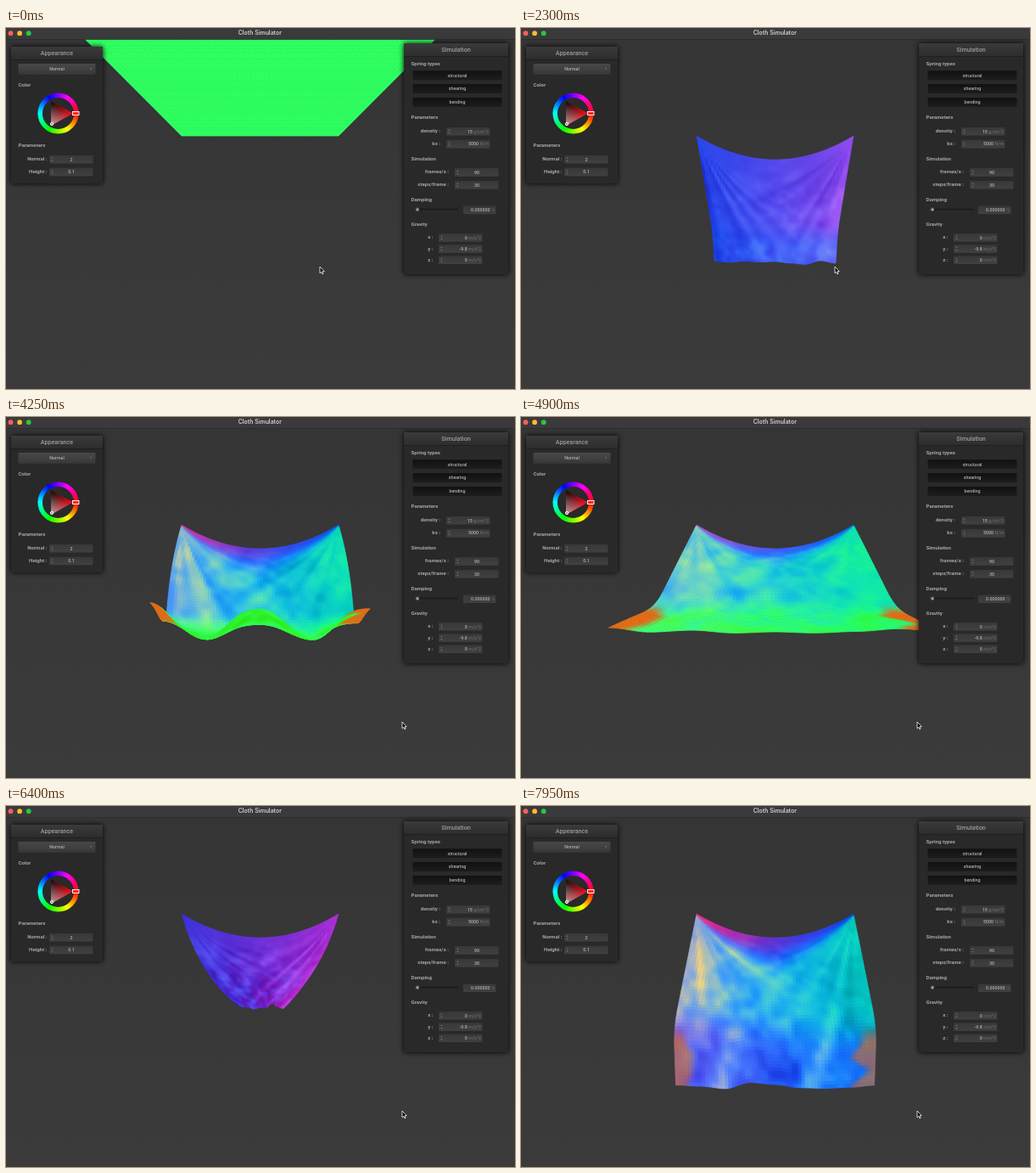
Write an HTML page with a canvas that moves like this. It is 600 px wide and 425 px high and loops after 8 s.

```html
<!DOCTYPE html>
<html lang="en">
<head>
<meta charset="utf-8">
<title>Cloth Simulator</title>
<style>
html, body { margin: 0; width: 100%; height: 100%; overflow: hidden; background: #383838; }
canvas { display: block; width: 600px; height: 425px; }
</style>
</head>
<body>
<canvas id="stage" width="600" height="425"></canvas>
<script>
const ctx = document.getElementById('stage').getContext('2d');
const LOOP = 8000, DROP = 950, CELLS = 60;

const clamp = x => Math.max(0, Math.min(1, x));
const mix = (a, b, k) => a + (b - a) * k;
const smooth = (a, b, x) => { x = clamp((x - a) / (b - a)); return x * x * (3 - 2 * x); };

// Smooth value noise in -1..1
const hash = (x, y) => { const h = Math.sin(x * 127.1 + y * 311.7) * 43758.5; return 2 * (h - Math.floor(h)) - 1; };
function noise(x, y) {
  const i = Math.floor(x), j = Math.floor(y), a = smooth(0, 1, x - i), b = smooth(0, 1, y - j);
  return mix(mix(hash(i, j), hash(i + 1, j), a), mix(hash(i, j + 1), hash(i + 1, j + 1), a), b);
}

// ---- Cloth: a unit square pinned by its far corners, swinging to and from the camera.
// Angles are degrees from hanging straight down, positive towards the camera.
const CAMERA = { x: 299.5, y: 219.5, focal: 293, distance: 1.585, pinHeight: .5 };
const swings = [
  { t: DROP, top: 90, hem: 90 },
  { t: 1600, top: 42, hem: 84 },
  { t: 2000, top: -5, hem: 20 },
  { t: 2850, top: -75, hem: -75, spread: 1.1 },
  { t: 3350, top: -62, hem: -66, spread: 1.25 },
  { t: 4250, top: 36, hem: 103, spread: .74, ripple: -18 },
  { t: 4720, top: 46, hem: 80, spread: .95 },
  { t: 5150, top: 44, hem: 78 },
  { t: 5550, top: 24, hem: 65, spread: .84, ripple: 18 },
  { t: 6400, top: -52, hem: -52, spread: .45 },
  { t: 7950, top: 28, hem: -5 }
].map(s => ({ spread: 1, ripple: 0, ...s }));

// Hermite interpolation, at rest at both ends.
function valueAt(t, name) {
  const last = swings.length - 1;
  if (t <= swings[0].t) return swings[0][name];
  if (t >= swings[last].t) return swings[last][name];
  const i = swings.findIndex(k => k.t > t) - 1, a = swings[i], b = swings[i + 1];
  const span = b.t - a.t, s = (t - a.t) / span, s2 = s * s, s3 = s2 * s;
  const slope = j => j <= 0 || j >= last ? 0
    : (swings[j + 1][name] - swings[j - 1][name]) / (swings[j + 1].t - swings[j - 1].t) * span;
  return (2 * s3 - 3 * s2 + 1) * a[name] + (s3 - 2 * s2 + s) * slope(i)
    + (3 * s2 - 2 * s3) * b[name] + (s3 - s2) * slope(i + 1);
}

function clothState(t) {
  const radians = name => valueAt(t, name) * Math.PI / 180;
  return {
    t, top: radians('top'), hem: radians('hem'),
    spread: valueAt(t, 'spread'), ripple: valueAt(t, 'ripple'),
    loose: smooth(DROP, 1700, t), age: smooth(1400, 3200, t)
  };
}
const bend = (cloth, v) => mix(cloth.top, cloth.hem, smooth(.6, .85, v));

// Follows the bent sheet from the pins to the hem and projects each row.
function clothGrid(cloth) {
  const { t, loose, age, spread, ripple } = cloth;
  const step = (1 + .05 * loose) / CELLS;
  let forward = 0, drop = 0;
  return Array.from({ length: CELLS + 1 }, (_, j) => {
    const v = j / CELLS;
    if (j) {
      const angle = bend(cloth, v - .5 / CELLS);
      forward += Math.sin(angle) * step;
      drop += Math.cos(angle) * step;
    }
    const scale = CAMERA.focal / (CAMERA.distance - forward);
    const width = scale * mix(1, spread, v * v);
    return Array.from({ length: CELLS + 1 }, (_, i) => {
      const u = i / CELLS;
      const sag = 28 * loose * 4 * u * (1 - u) * (1 - v) ** 2;
      const wave = smooth(.6, 1, v) * (ripple * Math.cos(4 * Math.PI * u) + 5 * age * noise(u * 8, t / 600));
      return [CAMERA.x + (u - .5) * width, CAMERA.y + scale * (drop - CAMERA.pinHeight) + sag + wave];
    });
  });
}

// Colour is the wrinkled surface normal mapped to RGB.
function clothColor(u, v, cloth) {
  const { t, loose, age } = cloth, base = bend(cloth, v);
  const front = smooth(-.5, .25, base), edge = Math.min(u, 1 - u);
  const angL = Math.atan2(v, u), angR = Math.atan2(v, 1 - u);
  const streak = loose * smooth(0, .25, v)
    * ((1 - u) * noise(angL * 11, t / 1500) + u * noise(angR * 11, 9 + t / 1500));
  const crease = age * smooth(0, .6, v + .2)
    * (noise(u * 9 + v * 3, v * 8 - t / 700) + .6 * noise(u * 24 - v * 5, v * 19 + t / 900));
  const rim = 1.1 * age * front * smooth(.42, .05, v / (1.05 - Math.abs(2 * u - 1)));
  const facing = Math.max(0, Math.cos(base));
  const tilt = (base > 0 ? base : base * .75) - rim
    + facing * (.35 * front * loose * (u - .5) + .3 * streak) + .32 * crease * mix(.5, 1, v);
  const side = loose * mix(-.3, .7 * facing, front) * (1 - 2 * u)
    + facing * (.4 * streak + .3 * crease) - .6 * Math.min(0, tilt);
  const nx = Math.max(-.95, Math.min(.95, side));
  const depth = Math.cos(tilt) * mix(1, Math.sqrt(1 - nx * nx), front);
  const rgb = [[nx, 2.45], [Math.sin(tilt), 1], [depth, 1.4]].map(([n, gamma]) => 255 * clamp((n + 1) / 2) ** gamma);
  // The lower corners turn over and show the underside.
  const turned = age * front * smooth(.35, .47, cloth.top) * smooth(.11, .05, edge + .05 * noise(v * 14, u)) * smooth(.7, .82, v);
  const underside = [225, 110, 25];
  return `rgb(${rgb.map((c, n) => Math.round(mix(c, underside[n], turned)))})`;
}

function drawCloth(t) {
  const cloth = clothState(t), grid = clothGrid(cloth);
  ctx.lineWidth = .7;
  for (let j = 0; j < CELLS; j++) for (let i = 0; i < CELLS; i++) {
    ctx.fillStyle = ctx.strokeStyle = clothColor((i + .5) / CELLS, (j + .5) / CELLS, cloth);
    polygon([grid[j][i], grid[j][i + 1], grid[j + 1][i + 1], grid[j + 1][i]]);
    ctx.fill();
    ctx.stroke();
  }
}

// ---- Interface
function polygon(points) {
  ctx.beginPath();
  points.forEach(p => ctx.lineTo(...p));
  ctx.closePath();
}
function disc(x, y, r, color) {
  ctx.fillStyle = color;
  ctx.beginPath();
  ctx.arc(x, y, r, 0, 7);
  ctx.fill();
}
function gradient(x0, y0, x1, y1, ...colors) {
  const g = ctx.createLinearGradient(x0, y0, x1, y1);
  colors.forEach((c, i) => g.addColorStop(i / (colors.length - 1), c));
  return g;
}
function box(x, y, w, h, top, bottom = top) {
  ctx.fillStyle = gradient(0, y, 0, y + h, top, bottom);
  ctx.beginPath();
  ctx.roundRect(x, y, w, h, 1);
  ctx.fill();
}
function text(str, x, y, { size = 6.1, color = '#a6a6a6', align = 'left', weight = 700, font = 'Roboto' } = {}) {
  ctx.font = `${weight} ${size}px ${font}, sans-serif`;
  ctx.fillStyle = color;
  ctx.textAlign = align;
  ctx.textBaseline = 'middle';
  ctx.fillText(str, x, y);
}
const small = { size: 5.3, weight: 500, align: 'center', color: '#b0b0b0' };

function panel(title, x, y, w, h) {
  ctx.save();
  ctx.shadowColor = '#000';
  ctx.shadowBlur = 6;
  box(x, y, w, h, '#292929');
  ctx.restore();
  box(x, y, w, 15, '#3a3a3a', '#2d2d2d');
  ctx.fillStyle = '#1c1c1c';
  ctx.fillRect(x, y + 15, w, .7);
  text(title, x + w / 2, y + 7.5, { size: 7.2, align: 'center', weight: 500, color: '#9c9c9c' });
}
function field(label, labelEnd, x, y, value, unit) {
  text(label, labelEnd, y - .3, { align: 'right' });
  box(x, y - 4.8, 51.5, 9.6, '#383838', '#404040');
  ctx.fillStyle = '#777';
  for (const d of [-1, 1]) {
    polygon([[x + 2.2, y + d], [x + 4.6, y + d], [x + 3.4, y + d * 2.6]]);
    ctx.fill();
  }
  if (!unit) return text(value, x + 26, y + .3, small);
  text(unit, x + 50, y + .3, { ...small, align: 'right', color: '#666' });
  text(value, x + 48.5 - ctx.measureText(unit).width, y + .3, { ...small, align: 'right' });
}

function colorWheel(x, y) {
  const hues = ctx.createConicGradient(0, x, y);
  for (let i = 0; i <= 12; i++) hues.addColorStop(i / 12, `hsl(${i * 30} 100% 50%)`);
  ctx.strokeStyle = hues;
  ctx.lineWidth = 5.5;
  ctx.beginPath();
  ctx.arc(x, y, 21.3, 0, 7);
  ctx.stroke();
  polygon([[x + 17.5, y], [x - 8.5, y + 14.5], [x - 8.5, y - 14.5]]);
  ctx.fillStyle = gradient(x - 9, y - 12, x + 16, y, '#111', '#f01020');
  ctx.fill();
  ctx.fillStyle = gradient(x - 8.5, y + 14.5, x + 3, y - 5, 'rgba(255,255,255,.6)', 'rgba(255,255,255,0)');
  ctx.fill();
  ctx.strokeStyle = '#fff';
  ctx.lineWidth = .9;
  ctx.beginPath();
  ctx.arc(x - 7.5, y + 12.5, 1.7, 0, 7);
  ctx.stroke();
  ctx.fillStyle = '#f22';
  ctx.fillRect(x + 17, y - 2, 7.5, 4);
  ctx.strokeRect(x + 17, y - 2, 7.5, 4);
}

function appearancePanel() {
  panel('Appearance', 6, 22, 108, 161);
  box(14.5, 42, 91, 12.7, '#484848', '#383838');
  text('Normal', 60, 48.5, small);
  text('›', 100, 47.5, small);
  text('Color', 14.5, 67);
  colorWheel(61.5, 100.5);
  text('Parameters', 14.5, 138.7);
  field('Normal :', 48.5, 51, 154.8, '2');
  field('Height :', 48.5, 51, 169.5, '0.1');
}

function simulationPanel() {
  panel('Simulation', 469, 18, 123, 272);
  [['Spring types', 42], ['Parameters', 105.5], ['Simulation', 154], ['Damping', 202], ['Gravity', 231.5]]
    .forEach(([title, y]) => text(title, 477.5, y));
  ['structural', 'shearing', 'bending'].forEach((name, i) => {
    const y = 50.3 + i * 15.8;
    box(479.5, y, 105, 11, '#111', '#1d1d1d');
    text(name, 532, y + 5.7, small);
  });
  field('density :', 512, 519, 121.7, '15', 'g/cm^2');
  field('ks :', 512, 519, 136.6, '5000', 'N/m');
  field('frames/s :', 522, 529, 169.9, '90');
  field('steps/frame :', 522, 529, 184.7, '30');
  box(485, 212.5, 48, 2, '#1b1b1b');
  disc(485, 213.7, 2.4, '#555');
  disc(485, 213.7, 1.3, '#aaa');
  box(539, 209.5, 38.5, 9.5, '#383838', '#404040');
  text('0.000000', 570.5, 214.7, { ...small, align: 'right' });
  text('%', 576.5, 214.7, { ...small, align: 'right', color: '#666' });
  [['x :', '0'], ['y :', '-9.8'], ['z :', '0']]
    .forEach(([axis, value], i) => field(axis, 503.5, 510, 246.8 + i * 13.25, value, 'm/s^2'));
}

function titleBar() {
  ctx.fillStyle = '#3a3a3c';
  ctx.fillRect(0, 0, 600, 13);
  ctx.fillStyle = '#2a2a2a';
  ctx.fillRect(0, 13, 600, .8);
  ['#ff5f57', '#febc2e', '#28c840'].forEach((c, i) => disc(5.5 + i * 10.6, 6.2, 2.9, c));
  text('Cloth Simulator', 299.3, 6.2, { size: 6.9, align: 'center', font: 'Inter', weight: 600, color: '#cfcfcf' });
}

function drawCursor(t) {
  const k = clamp((t - 3250) / 280);
  ctx.save();
  ctx.translate(mix(370, 467, k), mix(281, 359, k));
  polygon([[0, 0], [0, 7.6], [1.7, 6.1], [2.9, 8.7], [4, 8.2], [2.9, 5.7], [5.2, 5.5]]);
  ctx.fillStyle = '#000';
  ctx.fill();
  ctx.strokeStyle = '#fff';
  ctx.lineWidth = .8;
  ctx.stroke();
  ctx.restore();
}

const start = performance.now();
function draw() {
  const t = Math.max(0, performance.now() - start) % LOOP;
  ctx.fillStyle = gradient(0, 14, 0, 425, '#353535', '#3b3b3b');
  ctx.fillRect(0, 0, 600, 425);
  drawCloth(t);
  titleBar();
  appearancePanel();
  simulationPanel();
  drawCursor(t);
  requestAnimationFrame(draw);
}
draw();
</script>
</body>
</html>
```
